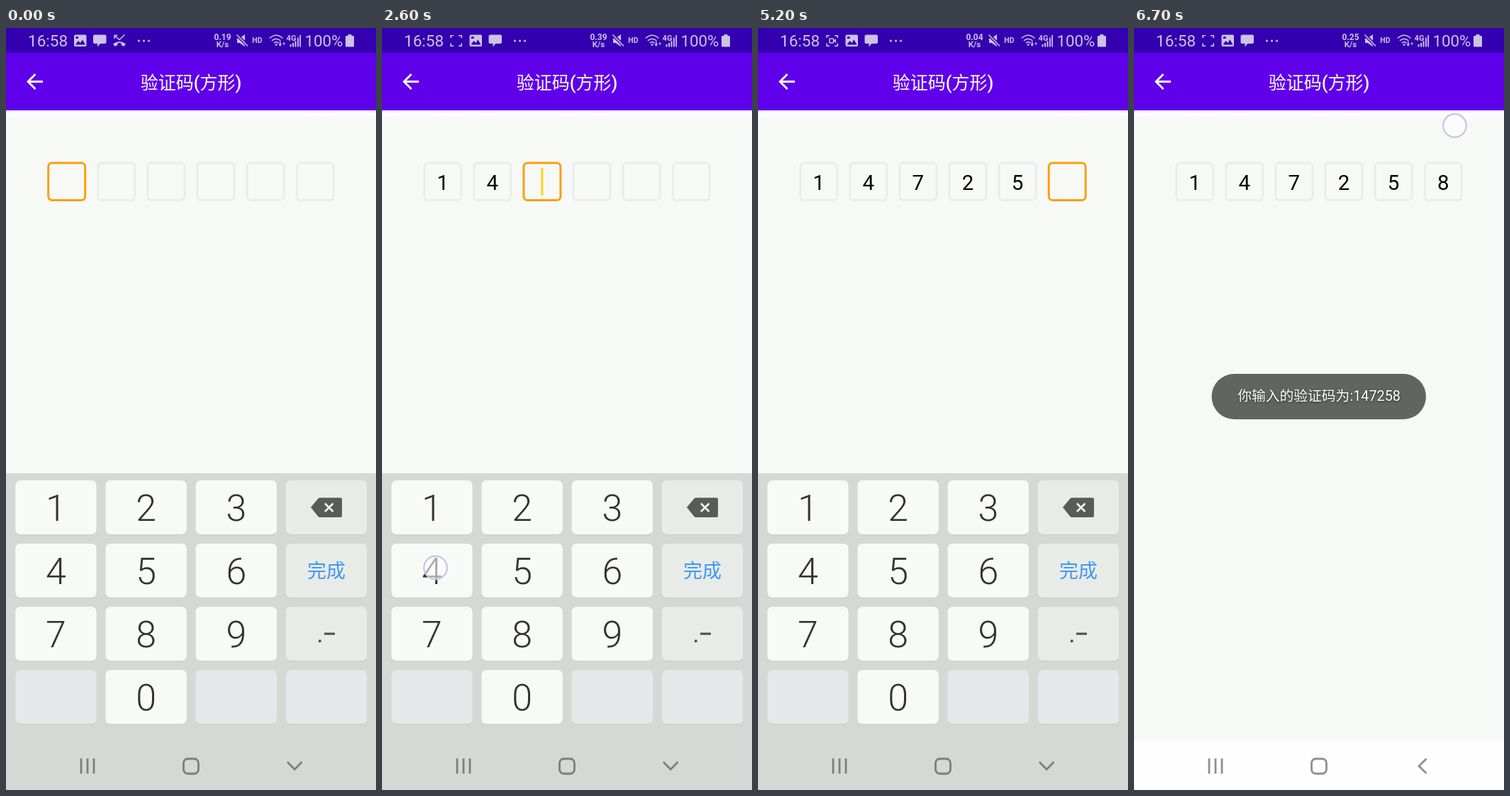
Write an HTML page that moves like this. It is 522 px wide and 1073 px high and loops after 6.8 s.

```html
<!DOCTYPE html>
<html lang="zh-CN">
<head>
<meta charset="utf-8">
<title>验证码</title>
<style>
html, body { margin: 0; width: 100%; height: 100%; overflow: hidden; background: #f7f9f7; }
svg { display: block; width: 100%; height: 100%; }
text { font-family: Roboto, "Noto Sans CJK SC", "Noto Sans CJK", sans-serif; text-anchor: middle; }
.line { fill: none; stroke-linecap: butt; stroke-linejoin: miter; }
#status { fill: #cdc2ea; }
#status .line { stroke: #cdc2ea; stroke-width: 1.6; }
#status .cut { fill: #3400b0; }
.left { text-anchor: start; }
.bold { font-weight: 700; }
.digit { font-size: 52px; font-weight: 300; fill: #333; }
.code { font-size: 29.5px; fill: #000; }
.nav { stroke-width: 2.8; }
#toast text { font-size: 19.8px; fill: #fff; text-shadow: 0 1px 3px rgba(0, 0, 0, .6); }
</style>
</head>
<body>
<svg viewBox="0 0 522 1073" preserveAspectRatio="none">
  <defs>
    <linearGradient id="fade" x2="0" y2="1">
      <stop stop-color="#fff"/><stop offset="1" stop-color="#f7f9f7"/>
    </linearGradient>
    <clipPath id="above"><path d="M0 600H522V1003H0z"/></clipPath>
  </defs>
  <rect width="522" height="1073" fill="#f7f9f7"/>
  <rect y="116" width="522" height="14" fill="url(#fade)"/>
  <rect width="522" height="35" fill="#3400b0"/>
  <rect y="35" width="522" height="81" fill="#6000ea"/>
  <path class="line" d="M41.5 65L31 75.5L41.5 86M31 75.5H52" stroke="#fff" stroke-width="2.8"/>
  <text x="261" y="85.5" font-size="25" font-weight="500" fill="#fff">验证码(方形)</text>

  <g id="status">
    <text class="left" x="31" y="26" font-size="22.5">16:58</text>
    <g id="cam">
      <path class="line" d="M97 14V10.800H101M108 10.800H112.200V14M112.200 21.500V25.200H108M101 25.200H97V21.500"/>
      <g id="lens">
        <rect class="line" x="100.800" y="15" width="5.800" height="6" rx="1"/>
        <path d="M107 17.500L110 15V21L107 18.500z"/>
      </g>
    </g>
    <g id="icons">
      <g>
        <rect x="96" y="9.500" width="17.500" height="16.500" rx="2"/>
        <path class="cut" d="M98 23.500L102 18L104.800 21L108 16.500L112 23.500zM98.500 12H102V15H98.500z"/>
      </g>
      <path d="M125 9.500H139.500Q141.500 9.500 141.500 11.500V20Q141.500 22 139.500 22H133L129 26.500V22H125Q123 22 123 20V11.500Q123 9.500 125 9.500z"/>
    </g>
    <g id="missed">
      <path d="M151 22.500Q160 15.500 169 22.500L166 26L162.500 23.800V21.300Q160 20.500 157.500 21.300V23.800L154 26z"/>
      <path class="line" d="M153 15V10.500H157.500M153.500 11L160 16.500L167.500 9.500"/>
    </g>
    <circle cx="187.500" cy="18" r="1.500"/><circle cx="194.500" cy="18" r="1.500"/><circle cx="201.500" cy="18" r="1.500"/>
    <text id="speed" class="bold" x="305.500" y="17" font-size="12"></text>
    <text class="bold" x="305.500" y="27" font-size="11.500">K/s</text>
    <path d="M326 14.500H329.500L337 9V26L329.500 21H326z"/>
    <path d="M325.500 9.500L341 25" stroke="#3400b0" stroke-width="4.500"/>
    <path class="line" d="M325.500 9.500L341 25.500"/>
    <text class="bold" x="354.500" y="21" font-size="10.500">HD</text>
    <path class="line" d="M372 14.500Q381 6 390.500 14.500M375 18Q381 12.500 387.500 18M378 21Q381 18.500 384.500 21"/>
    <path d="M379 22.500H383.500L381.200 25.500zM384.500 22.500H389L386.700 26zM390 23H394L392 20z"/>
    <path d="M386 19H387.500V23H386z"/>
    <text class="bold" x="402.500" y="17.500" font-size="11">4G</text>
    <path d="M400.500 23H402.500V26.500H400.500zM404 21H406V26.500H404zM407.500 18.500H409.500V26.500H407.500zM411 13.500H412.800V26.500H411zM414.200 10H416V26.500H414.200z"/>
    <text x="448.500" y="26" font-size="22.300">100%</text>
    <path d="M482.500 9H487.500V11H490Q491 11 491 12V25Q491 26.500 490 26.500H480Q479 26.500 479 25V12Q479 11 480 11H482.500z"/>
  </g>

  <g id="boxes"></g>
  <rect id="cursor" y="197" width="3" height="39" fill="#ffd21a"/>

  <rect y="1003" width="522" height="70" fill="#fefefe"/>
  <rect id="navBack" y="1003" width="522" height="70" fill="#d6d8d5"/>
  <g clip-path="url(#above)"><g id="board">
    <rect y="627" width="522" height="446" fill="#d6d8d5"/>
    <g id="keys"></g>
    <path d="M430 675L440.500 662.500Q441.500 661.500 443 661.500H472Q474 661.500 474 663.500V687Q474 689 472 689H443Q441.500 689 440.500 688z" fill="#595b59"/>
    <path class="line" d="M450 669.500L461.500 681M461.500 669.500L450 681" stroke="#f2f4f2" stroke-width="2.600"/>
    <text x="452" y="774" font-size="27" fill="#3c96f5">完成</text>
    <path d="M441 861.500H444.500V865H441zM449 851.500H464V854.500H449z" fill="#4a4c4a"/>
  </g></g>
  <g id="nav" class="line nav" stroke="#7d7f7d">
    <path d="M106 1028.500V1050M115 1028.500V1050M124 1028.500V1050"/>
    <rect x="250.500" y="1029" width="21" height="21" rx="6"/>
    <path id="chevron"/>
  </g>
  <g id="toast">
    <rect x="109.500" y="487" width="302.500" height="64" rx="32" fill="#626461"/>
    <text x="261" y="525">你输入的验证码为:147258</text>
  </g>
  <circle id="touch" r="16.300" fill="#fff" fill-opacity=".58" stroke="#c6c4e6" stroke-width="2.200"/>
</svg>
<script>
const LOOP = 6800, STEP = 100;
const $ = id => document.getElementById(id);
const clamp = v => Math.max(0, Math.min(1, v));

function add(parent, tag, attrs, label = '') {
  const el = document.createElementNS('http://www.w3.org/2000/svg', tag);
  for (const name in attrs) el.setAttribute(name, attrs[name]);
  el.textContent = label;
  return parent.appendChild(el);
}

// Key highlight lasts from start to release; the digit appears at typed.
const taps = [
  { key: '1', x: 72, y: 675, start: 1500, typed: 1600, release: 1700, end: 1800 },
  { key: '4', x: 75.5, y: 760, start: 2600, typed: 2600, release: 0, end: 2800 },
  { key: '7', x: 72, y: 852, start: 3200, typed: 3300, release: 3400, end: 3500 },
  { key: '2', x: 200, y: 677, start: 4000, typed: 4100, release: 4200, end: 4300 },
  { key: '5', x: 200, y: 769, start: 4700, typed: 4800, release: 0, end: 5000 },
  { key: '8', x: 209.5, y: 855, start: 5400, typed: 5500, release: 5900, end: 5700 },
  { key: '', x: 452.5, y: 137.5, start: 6600, typed: LOOP, release: 0, end: 7000 }
];
const speeds = [[0, '0.19'], [300, '0.39'], [3300, '0.04'], [6300, '0.25']];
const lensFlips = [1000, 1500, 2000, 2400, 3000, 3500, 4000, 4500, 5000, 5500, 6000, 6500];

const center = i => 85.7 + i * 70.1;
const boxes = [], digits = [], keys = {};
for (let i = 0; i < 6; i++) {
  boxes.push(add($('boxes'), 'rect', {
    x: center(i) - 26, y: 190, width: 52, height: 52.5, rx: 5.5, fill: 'none', 'stroke-width': 3
  }));
  digits.push(add($('boxes'), 'text', { class: 'code', x: center(i), y: 228 }, taps[i].key));
}

['123<', '456!', '789.', ' 0  '].forEach((row, r) => [...row].forEach((label, c) => {
  const x = 13.2 + c * 127.2, y = 637 + r * 89;
  const isDigit = label >= '0' && label <= '9';
  const fill = isDigit ? '#f8faf7' : label === ' ' ? '#e5e8e9' : '#e9ebe8';
  const shape = { x, width: 114.5, height: 76, rx: 7 };
  add($('keys'), 'rect', { ...shape, y: y + 1, fill: '#c9cbc8' });
  const face = add($('keys'), 'rect', { ...shape, y, fill });
  if (isDigit) {
    keys[label] = face;
    add($('keys'), 'text', { class: 'digit', x: x + 57.2, y: y + 57 }, label);
  }
}));

function draw(time) {
  const t = Math.floor(time / STEP) * STEP;
  const count = taps.filter(tap => t >= tap.typed).length;

  boxes.forEach((box, i) => {
    box.setAttribute('stroke', i === count ? '#fb9f0a' : '#ebedeb');
    digits[i].setAttribute('opacity', i < count ? 1 : 0);
  });
  const blink = t >= 300 && Math.floor((t - 300) / 500) % 2 === 0;
  $('cursor').setAttribute('x', center(count) - 1.5);
  $('cursor').setAttribute('opacity', blink && count < 6 ? 1 : 0);

  const slide = clamp(t / 400);
  $('icons').setAttribute('transform', `translate(${27.5 * slide} 0)`);
  $('missed').setAttribute('opacity', 1 - slide);
  $('cam').setAttribute('opacity', slide);
  $('lens').setAttribute('opacity', lensFlips.filter(f => t >= f).length % 2);
  $('speed').textContent = speeds.filter(s => t >= s[0]).pop()[1];

  // Keyboard sinks and fades once the last digit is in.
  const k = Math.max(0, (t - 5500) / 100);
  const shown = clamp(1 - 0.07 * k ** 2.5);
  $('board').setAttribute('transform', `translate(0 ${6.6 * k * k})`);
  $('board').setAttribute('opacity', shown);
  $('navBack').setAttribute('opacity', shown);
  $('nav').setAttribute('stroke', shown > 0.5 ? '#7d7f7d' : '#8e908e');
  $('chevron').setAttribute('d', t < 5600
    ? 'M397 1033.500L407.200 1044L417.500 1033.500'
    : 'M412.500 1029L402 1039.300L412.500 1049.500');
  $('toast').setAttribute('opacity', clamp((t - 5700) / 333));

  let active = null;
  for (const tap of taps) {
    if (tap.key) {
      const pressed = t >= tap.start && t < tap.release;
      keys[tap.key].setAttribute('fill', pressed ? '#b3b6b3' : '#f8faf7');
    }
    if (t >= tap.start && t < tap.end) active = tap;
  }
  $('touch').setAttribute('opacity', active ? clamp((active.end - t) / 200) : 0);
  if (active) {
    $('touch').setAttribute('cx', active.x);
    $('touch').setAttribute('cy', active.y);
  }
}

const start = performance.now();
function tick() {
  draw((performance.now() - start) % LOOP);
  requestAnimationFrame(tick);
}
tick();
</script>
</body>
</html>
```
